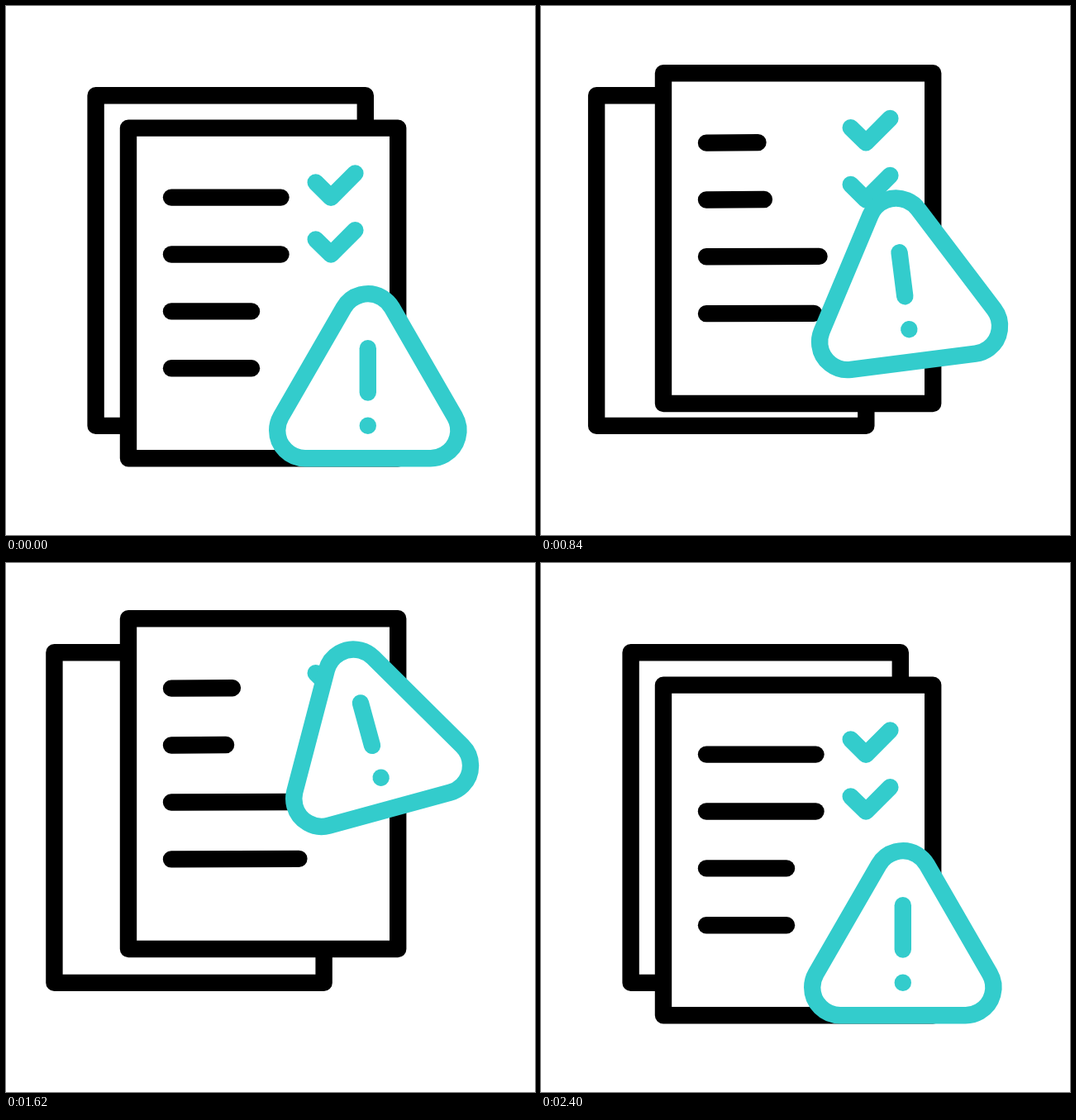
Recreate the animation shown at these times as an HTML page with a canvas. Size 640 px wide and 640 px high, loop 2.42 s.

```html
<!DOCTYPE html>
<html lang="en">
<head>
<meta charset="utf-8">
<title>Checklist warning</title>
<style>
  html, body { margin: 0; width: 100%; height: 100%; overflow: hidden; background: #fff; }
  canvas { display: block; width: 100vmin; height: 100vmin; }
</style>
</head>
<body>
<canvas id="stage" width="640" height="640"></canvas>
<script>
const ctx = document.getElementById('stage').getContext('2d');
const LOOP = 2420, STEP = 20;
const INK = '#000', TEAL = '#33cccc', PAPER = '#fff';
const PAGE = { w: 326.2, h: 399.7 };
const ROW = 68.9;
const WARNING = { x: 437.8, y: 447.8, rise: 246, tilt: 15.3 * Math.PI / 180 };

// Each row's length swings between two ends; lower rows start earlier.
const ROWS = [
  { length: 132.5, change: -84.5, start: 120 },
  { length: 132.5, change: -84.5, start: 80 },
  { length: 97, change: 61.5, start: 40 },
  { length: 97, change: 61.5, start: 0 }
];

const clamp = v => Math.min(1, Math.max(0, v));
const smooth = u => u * u * (3 - 2 * u);

// Two eased there-and-back swings, each leg lasting `leg` ms.
function swing(t, start, leg) {
  const u = (t - start) / leg;
  if (u <= 0 || u >= 4) return 0;
  return smooth(1 - Math.abs(u % 2 - 1));
}

// Cubic curve with a linear start and a soft landing.
function softLanding(x) {
  if (x <= 0 || x >= 1) return clamp(x);
  const curve = (s, a, b) => 3 * (1 - s) ** 2 * s * a + 3 * (1 - s) * s * s * b + s ** 3;
  let lo = 0, hi = 1;
  for (let i = 0; i < 24; i++) {
    const mid = (lo + hi) / 2;
    if (curve(mid, 1 / 6, 2 / 3) < x) lo = mid; else hi = mid;
  }
  return curve(lo, 1 / 6, 1);
}

function lift(t) {
  return t < 1590 ? softLanding((t - 440) / 1095) : softLanding((2139 - t) / 499);
}

function line(color, ...points) {
  ctx.strokeStyle = color;
  ctx.beginPath();
  points.forEach(([x, y]) => ctx.lineTo(x, y));
  ctx.stroke();
}

function page(x, y) {
  ctx.fillStyle = PAPER;
  ctx.strokeStyle = INK;
  ctx.beginPath();
  ctx.rect(x, y, PAGE.w, PAGE.h);
  ctx.fill();
  ctx.stroke();
}

function check(y) {
  line(TEAL, [374.7, y + 213.5], [393.1, y + 231.7], [422.4, y + 202.4]);
}

function warning(amount) {
  ctx.save();
  ctx.translate(WARNING.x, WARNING.y - WARNING.rise * amount);
  ctx.rotate(-WARNING.tilt * amount);

  // Equilateral triangle with corners rounded around three centres.
  const radius = 33.7, half = 75.9, top = -65.9, bottom = 65.7;
  ctx.beginPath();
  [[0, top, -150], [half, bottom, -30], [-half, bottom, 90]].forEach(([x, y, from]) => {
    const a = from * Math.PI / 180;
    ctx.arc(x, y, radius, a, a + Math.PI * 2 / 3);
  });
  ctx.closePath();
  ctx.fillStyle = PAPER;
  ctx.strokeStyle = TEAL;
  ctx.fill();
  ctx.stroke();

  line(TEAL, [0, -33.6], [0, 19.8]);
  ctx.fillStyle = TEAL;
  ctx.beginPath();
  ctx.arc(0, 60, 10.2, 0, Math.PI * 2);
  ctx.fill();
  ctx.restore();
}

function draw(t) {
  ctx.fillStyle = PAPER;
  ctx.fillRect(0, 0, 640, 640);
  ctx.lineWidth = 20.4;
  ctx.lineCap = ctx.lineJoin = 'round';

  const shift = swing(t, 0, 600);
  const up = -102.4 * shift;
  page(108.6 - 64 * shift, 108.2);
  page(148, 147.6 + up);

  ROWS.forEach((row, i) => {
    const amount = swing(t, row.start, 570);
    const y = 231.6 + ROW * i + up;
    line(INK, [200, y + 0.4 * amount], [200 + row.length + row.change * amount, y - 0.2 * amount]);
  });

  check(up);
  check(up + ROW);
  warning(lift(t));
}

function frame() {
  const t = performance.now() % LOOP;
  draw(Math.floor(t / STEP) * STEP);
  requestAnimationFrame(frame);
}
frame();
</script>
</body>
</html>
```
